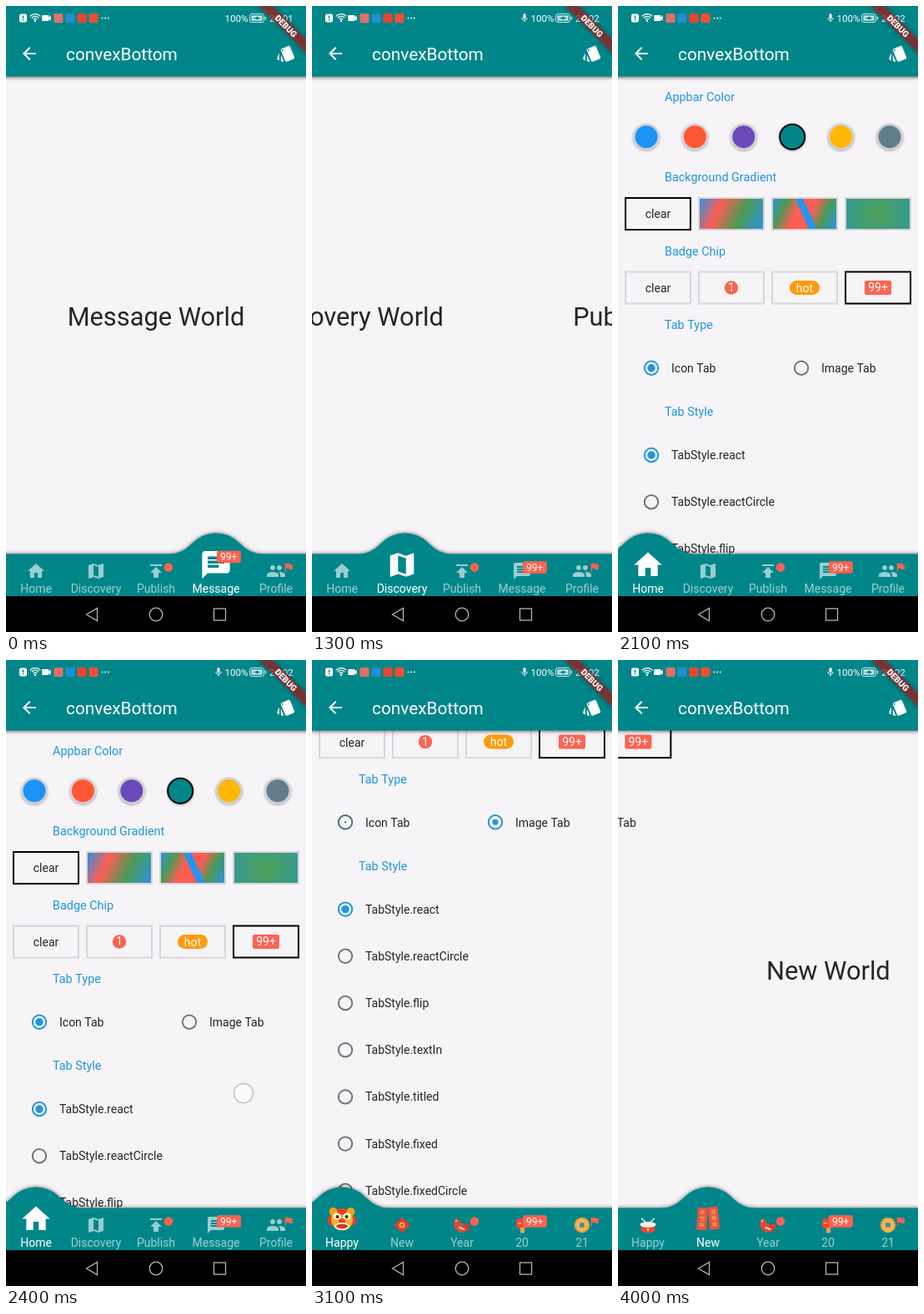
Animation, 360 px wide and 750 px high, one loop 4.1 s. Source, as an HTML page with a canvas:

```html
<!DOCTYPE html>
<html lang="en">
<head>
<meta charset="utf-8">
<title>convexBottom</title>
<style>
html, body { margin: 0; width: 100%; height: 100%; overflow: hidden; background: #000; }
canvas { display: block; width: 360px; height: 750px; }
</style>
</head>
<body>
<canvas id="stage"></canvas>
<script>
const W = 360, H = 750, LOOP = 4100, STEP = 100;
const TEAL = '#008689', PAGE = '#f6f4f7', INK = '#252427', BLUE = '#1f95e2';
const GREY = '#757377', LINE = '#d8d6da', BADGE = '#ff6250', DIM = 'rgba(255,255,255,.6)';

const canvas = document.getElementById('stage');
const ctx = canvas.getContext('2d');
const dpr = window.devicePixelRatio || 1;
canvas.width = W * dpr;
canvas.height = H * dpr;

const icons = {
  back: 'M20 11H7.83l5.59-5.59L12 4l-8 8 8 8 1.41-1.41L7.83 13H20v-2z',
  style: 'M2.53 19.65l1.34.56v-9.03l-2.43 5.86c-.41 1.02.08 2.19 1.09 2.61zm19.5-3.7L17.07 3.98c-.31-.75-1.04-1.21-1.81-1.23-.26 0-.53.04-.79.15L7.1 5.95c-.75.31-1.21 1.03-1.23 1.8-.01.27.04.54.15.8l4.96 11.97c.31.76 1.05 1.22 1.83 1.23.26 0 .52-.05.77-.15l7.36-3.05c1.02-.42 1.51-1.59 1.09-2.6zM7.88 8.75c-.55 0-1-.45-1-1s.45-1 1-1 1 .45 1 1-.45 1-1 1zm-2 11c0 1.1.9 2 2 2h1.45l-3.45-8.34v6.34z',
  Home: 'M10 20v-6h4v6h5v-8h3L12 3 2 12h3v8z',
  Discovery: 'M20.5 3l-.16.03L15 5.1 9 3 3.36 4.9c-.21.07-.36.25-.36.48V20.5c0 .28.22.5.5.5l.16-.03L9 18.9l6 2.1 5.64-1.9c.21-.07.36-.25.36-.48V3.5c0-.28-.22-.5-.5-.5zM15 19l-6-2.11V5l6 2.11V19z',
  Publish: 'M5 4v2h14V4H5zm0 10h4v6h6v-6h4l-7-7-7 7z',
  Message: 'M20 2H4c-1.1 0-1.99.9-1.99 2L2 22l4-4h14c1.1 0 2-.9 2-2V4c0-1.1-.9-2-2-2zM6 9h12v2H6V9zm8 5H6v-2h8v2zm4-6H6V6h12v2z',
  Profile: 'M16 11c1.66 0 2.99-1.34 2.99-3S17.66 5 16 5c-1.66 0-3 1.34-3 3s1.34 3 3 3zm-8 0c1.66 0 2.99-1.34 2.99-3S9.66 5 8 5C6.34 5 5 6.34 5 8s1.34 3 3 3zm0 2c-2.33 0-7 1.17-7 3.5V19h14v-2.5c0-2.33-4.67-3.5-7-3.5zm8 0c-.29 0-.62.02-.97.05 1.16.84 1.97 1.97 1.97 3.45V19h6v-2.5c0-2.33-4.67-3.5-7-3.5z',
  flag: 'M14.4 6L14 4H5v17h2v-7h5.6l.4 2h7V6z',
  video: 'M17 10.5V7c0-.55-.45-1-1-1H4c-.55 0-1 .45-1 1v10c0 .55.45 1 1 1h12c.55 0 1-.45 1-1v-3.5l4 4v-11l-4 4z',
  mic: 'M12 14c1.66 0 3-1.34 3-3V5c0-1.66-1.34-3-3-3S9 3.34 9 5v6c0 1.66 1.34 3 3 3zm5.3-3c0 3-2.54 5.1-5.3 5.1S6.7 14 6.7 11H5c0 3.41 2.72 6.23 6 6.72V21h2v-3.28c3.28-.48 6-3.3 6-6.72h-1.7z'
};
for (const k in icons) icons[k] = new Path2D(icons[k]);

const iconTabs = ['Home', 'Discovery', 'Publish', 'Message', 'Profile'];
const imageTabs = ['Happy', 'New', 'Year', '20', '21'];
const styles = ['react', 'reactCircle', 'flip', 'textIn', 'titled', 'fixed', 'fixedCircle'];

// Tab changes: start time and chosen tab
const taps = [[340, 2], [1190, 1], [1790, 0], [3851, 1]];
// Finger marks: from, to, x, y, opacity
const touches = [
  [200, 340, 186, 690, .5], [1100, 1190, 114, 690, .5], [1700, 1790, 45, 690, .5],
  [3000, 3090, 226, 196, 1], [3600, 3690, 112, 690, .3], [3700, 3850, 112, 690, .5]
];

const clamp = v => Math.max(0, Math.min(1, v));
const mix = (a, b, p) => a + (b - a) * p;

// cubic-bezier(.25, .1, .25, 1)
function ease(x) {
  if (x <= 0 || x >= 1) return clamp(x);
  let lo = 0, hi = 1, u;
  for (let i = 0; i < 24; i++) {
    u = (lo + hi) / 2;
    const bx = .75 * u * (1 - u) + u * u * u;
    if (bx < x) lo = u; else hi = u;
  }
  return .3 * u * (1 - u) ** 2 + 3 * u * u * (1 - u) + u ** 3;
}

function text(s, x, y, size, color, align = 'left', weight = 400) {
  ctx.font = `${weight} ${size}px Roboto, "Noto Sans CJK SC", sans-serif`;
  ctx.textAlign = align;
  ctx.fillStyle = color;
  ctx.fillText(s, x, y + size * .355);
}

function rect(x, y, w, h, color, r = 0) {
  ctx.fillStyle = color;
  ctx.beginPath();
  ctx.roundRect(x, y, w, h, r);
  ctx.fill();
}

function oval(x, y, rx, ry, color, turn = 0) {
  ctx.fillStyle = color;
  ctx.beginPath();
  ctx.ellipse(x, y, rx, ry, turn, 0, 7);
  ctx.fill();
}

const disc = (x, y, r, color) => oval(x, y, r, r, color);

function ring(x, y, r, width, color) {
  ctx.strokeStyle = color;
  ctx.lineWidth = width;
  ctx.beginPath();
  ctx.arc(x, y, r, 0, 7);
  ctx.stroke();
}

function at(x, y, scale, turn, draw) {
  ctx.save();
  ctx.translate(x, y);
  ctx.rotate(turn);
  ctx.scale(scale, scale);
  draw();
  ctx.restore();
}

function icon(name, x, y, size, color) {
  at(x, y, size / 24, 0, () => {
    ctx.translate(-12, -12);
    ctx.fillStyle = color;
    ctx.fill(icons[name]);
  });
}

function withShadow(color, blur, dy, draw) {
  ctx.save();
  ctx.shadowColor = color;
  ctx.shadowBlur = blur * dpr;
  ctx.shadowOffsetY = dy * dpr;
  draw();
  ctx.restore();
}

function box(x, y, selected) {
  ctx.strokeStyle = selected ? '#000' : LINE;
  ctx.lineWidth = 2;
  ctx.strokeRect(x + 1, y + 1, 78, 38);
}

function blend(g, stops) {
  stops.forEach(([p, c]) => g.addColorStop(p, c));
  return g;
}

function gradients(y) {
  const red = '#ff5c55', green = '#4b9a55', blue = '#2b92e0';
  const diagonal = (x, stops) =>
    rect(x, y, 76, 36, blend(ctx.createLinearGradient(x, y, x + 76, y + 36), stops));
  diagonal(98, [[0, blue], [.3, red], [.64, green], [1, blue]]);
  diagonal(186, [[0, blue], [.18, green], [.38, red], [.58, red], [.76, green], [1, blue]]);
  ctx.fillStyle = '#2496ee';
  ctx.beginPath();
  ctx.moveTo(213, y);
  ctx.lineTo(222, y);
  ctx.lineTo(239, y + 36);
  ctx.lineTo(229, y + 36);
  ctx.fill();
  rect(274, y, 76, 36, blend(ctx.createRadialGradient(312, y + 18, 2, 312, y + 18, 42),
    [[0, '#4c9f58'], [1, '#359a94']]));
}

function radio(x, y, on) {
  ring(x, y, 8.2, 2, on > .5 ? BLUE : on > 0 ? '#4f6f86' : GREY);
  if (on > 0) disc(x, y, 4.7 * on, BLUE);
}

function settings(scroll, image) {
  const header = (s, y) => text(s, 56, y, 14.4, BLUE);
  ctx.save();
  ctx.translate(0, -scroll);
  header('Appbar Color', 109);
  ['#1c94f5', '#ff5733', '#6a4bb7', TEAL, '#ffb708', '#607d8b'].forEach((c, i) => {
    const x = 34 + i * 58.4, y = 156.8, on = i === 3;
    withShadow('rgba(0,0,0,.3)', 3, 1, () => disc(x, y, 16, on ? '#000' : '#d3d1d6'));
    disc(x, y, on ? 14 : 13.5, c);
  });
  header('Background Gradient', 205);
  gradients(231);
  header('Badge Chip', 293.5);
  for (let i = 0; i < 4; i++) {
    box(8 + i * 88, 229, i === 0);
    box(8 + i * 88, 317.5, i === 3);
  }
  text('clear', 48, 249.5, 14, INK, 'center');
  text('clear', 48, 338, 14, INK, 'center');
  disc(136, 337.5, 8.2, BADGE);
  text('1', 136, 337.5, 14, '#fff', 'center');
  rect(206, 329, 36, 17, '#ff9a0a', 8.5);
  text('hot', 224, 337.8, 14, '#fff', 'center');
  rect(296, 329, 32, 17, BADGE, 2);
  text('99+', 312, 337.5, 14, '#fff', 'center');
  header('Tab Type', 382);
  radio(40, 433.7, 1 - image);
  text('Icon Tab', 64, 434, 14, INK);
  radio(220, 433.7, image);
  text('Image Tab', 244, 434, 14, INK);
  header('Tab Style', 486);
  styles.forEach((s, i) => {
    const y = 538 + i * 56.2;
    radio(40, y, i ? 0 : 1);
    text('TabStyle.' + s, 64, y, 14, INK);
  });
  ctx.restore();
}

function statusBar(late) {
  const y = 14.5;
  rect(16, 9.5, 9, 10, '#fff', 2);
  rect(19.8, 11.5, 1.5, 3.6, TEAL);
  rect(19.8, 16, 1.5, 1.5, TEAL);
  ctx.lineWidth = 1.2;
  ctx.strokeStyle = '#fff';
  for (const r of [3, 5.8, 8.6]) {
    ctx.beginPath();
    ctx.arc(35, 18.2, r, -Math.PI * .76, -Math.PI * .24);
    ctx.stroke();
  }
  disc(35, 18, 1.2, '#fff');
  icon('video', 48.5, y, 14, '#fff');
  ['#e0706a', '#1f8fd0', '#e8452f', '#f05032'].forEach((c, i) => rect(57.5 + i * 14, 9, 11, 11, c, 1.5));
  for (let i = 0; i < 3; i++) disc(115.5 + i * 3.6, y, .9, '#fff');
  if (late) icon('mic', 255, y, 12.5, '#fff');
  text('100%', 262.5, y + .3, 11.6, '#fff');
  ctx.lineWidth = 1;
  ctx.strokeStyle = 'rgba(255,255,255,.8)';
  ctx.beginPath();
  ctx.roundRect(292.5, 9.5, 17, 10, 2.5);
  ctx.stroke();
  rect(294.3, 11.3, 13.4, 6.4, 'rgba(255,255,255,.75)', 1);
  rect(310.8, 12.5, 1.4, 4, 'rgba(255,255,255,.8)', .7);
  rect(297, 14, 8, 1.2, TEAL);
  disc(301.5, 14.6, 1.8, TEAL);
  text(late ? '20:02' : '20:01', 316, y + .3, 11.5, '#fff');
}

function topBar(late) {
  withShadow('rgba(0,0,0,.5)', 4, 1.5, () => rect(-10, -10, W + 20, 94.4, TEAL));
  statusBar(late);
  icon('back', 28, 57, 24, '#fff');
  text('convexBottom', 72, 58, 20.8, '#fff');
  icon('style', 336, 57, 24, '#fff');
}

const images = {
  Happy(active) {
    if (active) {
      for (const s of [-1, 1]) {
        oval(s * 10, -8, 5, 6, '#f6a21c', s * .6);
        oval(s * 13, 2, 4, 6, '#e6402f');
      }
      oval(0, 1, 13, 13, '#f9b02c');
      oval(0, -9, 6, 4, '#e6402f');
      for (const s of [-1, 1]) {
        oval(s * 6, -3, 4.6, 4, '#fff4d8');
        disc(s * 5.5, -2.5, 2, '#402020');
      }
      oval(0, 3, 4, 3, '#e6402f');
      oval(0, 9, 9, 4.5, '#fff0d0');
      oval(0, 9, 7, 2.8, '#d8352b');
      return;
    }
    ctx.strokeStyle = '#fff0dc';
    ctx.lineWidth = 1.3;
    ctx.beginPath();
    ctx.moveTo(-8, -8); ctx.lineTo(-1, -2);
    ctx.moveTo(8, -8); ctx.lineTo(1, -2);
    ctx.stroke();
    rect(-8.5, -1, 17, 10, '#e8483a', 4.5);
    oval(0, -.5, 9.5, 3.4, '#fff3df');
    disc(0, 5, 1.6, '#ffc24a');
  },
  New(active) {
    if (active) {
      for (const s of [-1, 1]) at(s * 7, s * -.5, 1, s < 0 ? .06 : -.1, () => {
        rect(-6, -14, 12, 27, '#ee5040', 1);
        [...(s < 0 ? '恭賀新' : '迎春來')].forEach((c, i) => text(c, 0, -8 + i * 7.5, 6.5, '#ffc65a', 'center'));
      });
      return;
    }
    at(0, 0, 1, Math.PI / 4, () => rect(-6.7, -6.7, 13.4, 13.4, '#e8392c', 1));
    disc(0, 0, 3.6, '#ffb347');
    rect(-2.2, -.6, 4.4, 1.2, '#e8392c');
    rect(-.6, -2.2, 1.2, 4.4, '#e8392c');
  },
  Year() {
    oval(-6, -4, 3.5, 3.5, '#e8483a');
    oval(-2, 3, 8, 5, '#e8483a', .5);
    oval(5, 3, 5, 4, '#d83c30', -.7);
    disc(-7, -5, 1.2, '#ffc24a');
    oval(0, 4, 4, 1.2, '#ffd9a0', .4);
  },
  20() {
    rect(-7, -8, 14, 12, '#e8483a', 4);
    rect(-2, 3, 5, 6.5, '#f2a04a', 1);
    rect(-5, -3, 4, 1.5, '#ffc24a');
  },
  21() {
    disc(0, 0, 9.2, '#e6a040');
    disc(0, 0, 7.4, '#f2b55a');
    rect(-2.8, -2.8, 5.6, 5.6, '#3f8f86', 1);
  }
};

function badge(i, x, y) {
  if (i === 2) disc(x + 15, y, 5.2, BADGE);
  if (i === 3) {
    rect(x + 1, y - 7.2, 28.8, 14.4, BADGE, 2);
    text('99+', x + 15.2, y, 12, '#fff', 'center');
  }
  if (i === 4) icon('flag', x + 15, y, 14.4, BADGE);
}

function barShape(x) {
  const top = 656.6, cy = 671.6, r = 40, px = 28.91, py = 27.64;
  const a = Math.atan2(-py, -px), b = Math.atan2(-py, px);
  ctx.fillStyle = TEAL;
  ctx.beginPath();
  ctx.moveTo(-40, top);
  ctx.lineTo(x - 56, top);
  ctx.quadraticCurveTo(x - 41, top, x - px, cy - py);
  ctx.arc(x, cy, r, a, b);
  ctx.quadraticCurveTo(x + 41, top, x + 56, top);
  ctx.lineTo(W + 40, top);
  ctx.lineTo(W + 40, 720);
  ctx.lineTo(-40, 720);
  ctx.fill();
}

function bottomBar(s) {
  withShadow('rgba(0,0,0,.5)', 4, -.5, () => barShape(36 + 72 * s.bump));
  s.tabs.forEach((name, i) => {
    const x = 36 + i * 72, active = i === s.tab;
    const y = active ? 669.6 : 677, grow = active ? s.grow : 1;
    if (grow > 0) {
      if (images[name]) at(x, y, grow, 0, () => images[name](active));
      else icon(name, x, y, (active ? 40 : 24) * grow, active ? '#fff' : DIM);
    }
    badge(i, x, active ? 660 : 672.5);
    text(name, x, 698, 14, active ? '#fff' : DIM, 'center');
  });
}

function navBar() {
  rect(0, 707, W, 43, '#000');
  ctx.strokeStyle = '#b4b4b4';
  ctx.lineWidth = 1.3;
  ctx.beginPath();
  ctx.moveTo(96.5, 729);
  ctx.lineTo(109.5, 721.5);
  ctx.lineTo(109.5, 736.5);
  ctx.closePath();
  ctx.stroke();
  ring(180, 729, 7.8, 1.3, '#b4b4b4');
  ctx.strokeRect(249.5, 722, 14, 14);
}

function banner() {
  at(W, 0, 1, Math.PI / 4, () => {
    withShadow('rgba(0,0,0,.5)', 6, 0, () => rect(-40, 28, 80, 12, 'rgba(183,28,28,.63)'));
    text('DEBUG', 0, 34, 10.2, '#fff', 'center', 900);
  });
}

function finger(x, y, alpha) {
  ctx.save();
  ctx.globalAlpha = alpha;
  disc(x, y, 11.5, 'rgba(255,255,255,.55)');
  ring(x, y, 11.5, 1.4, 'rgba(150,148,156,.6)');
  ctx.restore();
}

function scrollAt(t) {
  if (t < 2600) return 198 * clamp((t - 2400) / 200);
  return 198 + 41.4 * (1 - (1 - clamp((t - 2600) / 300)) ** 3);
}

function stateAt(t) {
  const s = { tab: 3, pos: 3, bump: 3, grow: 1 };
  for (const [start, to] of taps) {
    if (t < start) break;
    const from = s.tab;
    s.tab = to;
    s.pos = mix(from, to, ease((t - start) / 300));
    s.bump = mix(from, to, ease((t - start - 10) / 138));
    s.grow = ease((t - start - 10) / 138);
  }
  s.scroll = scrollAt(t);
  s.image = ease((t - 3010) / 200);
  s.tabs = t >= 3010 ? imageTabs : iconTabs;
  return s;
}

function render(t) {
  const s = stateAt(t);
  ctx.setTransform(dpr, 0, 0, dpr, 0, 0);
  rect(0, 0, W, H, PAGE);
  for (const i of new Set([Math.floor(s.pos), Math.ceil(s.pos)])) {
    ctx.save();
    ctx.translate((i - s.pos) * W, 0);
    if (i === 0) settings(s.scroll, s.image);
    else text(s.tabs[i] + ' World', 180, 371.8, 30.8, INK, 'center');
    ctx.restore();
  }
  topBar(t >= 800);
  bottomBar(s);
  navBar();
  banner();
  for (const [a, b, x, y, alpha] of touches) if (t >= a && t < b) finger(x, y, alpha);
  if (t >= 2400 && t <= 2600) finger(285, 519 - s.scroll, 1);
  // press glow fading out on the Home tab
  if (t > 1790 && t < 1890) disc(45, 690, 9, 'rgba(0,60,80,.05)');
}

const start = performance.now();
function tick() {
  const t = (performance.now() - start) % LOOP;
  render(Math.floor(t / STEP) * STEP); // ten pictures a second
  requestAnimationFrame(tick);
}
tick();
</script>
</body>
</html>
```
